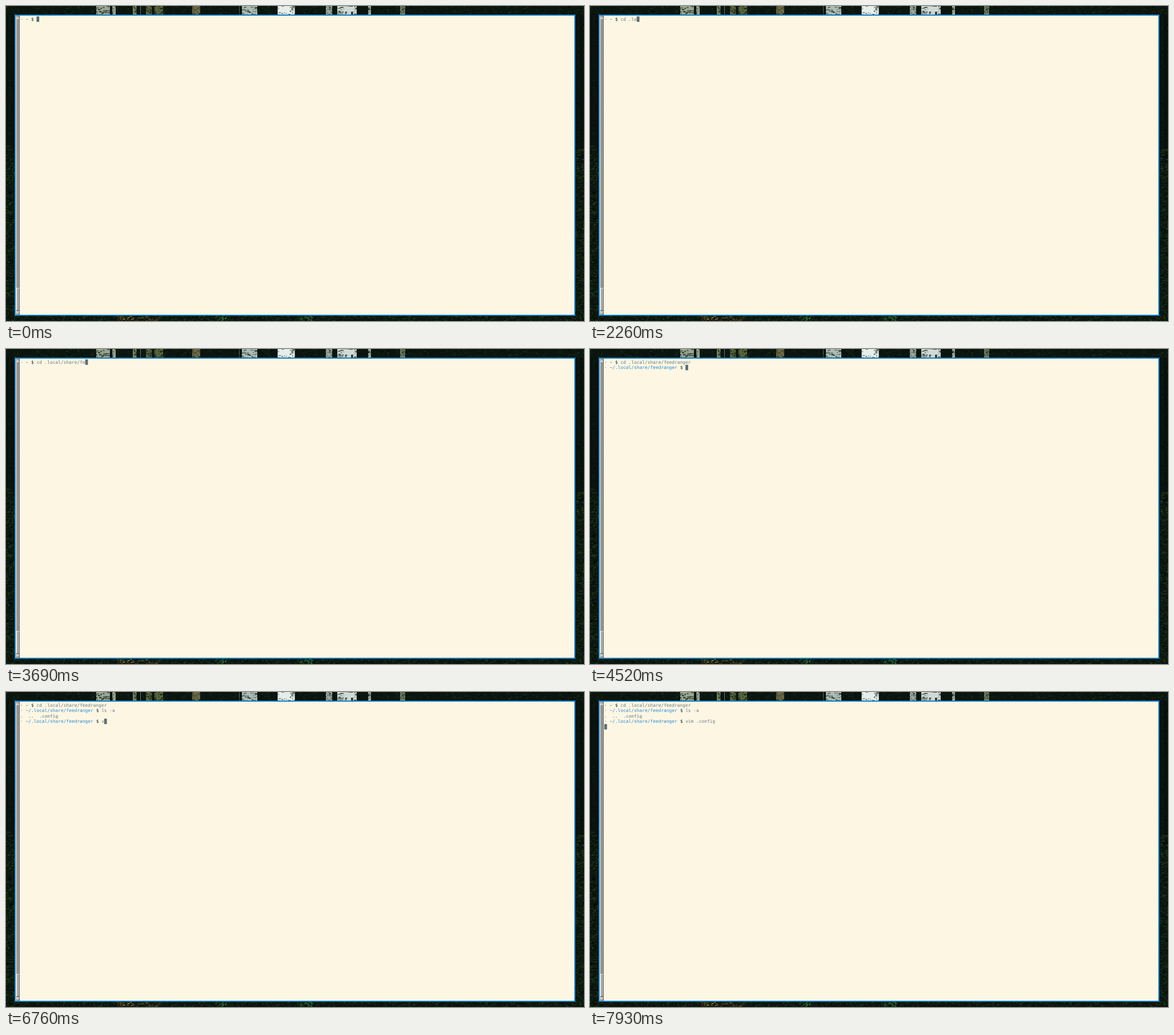
Animation of 1012 by 553 pixels, one loop 8000 ms. Source, as an HTML page with a canvas:

```html
<!DOCTYPE html>
<html lang="en">
<head>
<meta charset="utf-8">
<title>Terminal session</title>
<style>
  html, body { margin: 0; width: 100%; height: 100%; overflow: hidden; background: #0a120d; }
  canvas { display: block; }
</style>
</head>
<body>
<canvas id="stage" width="1012" height="553"></canvas>
<script>
const ctx = document.getElementById('stage').getContext('2d');
const LOOP = 8000, LEFT = 25, TOP = 18, COL = 4.738, ROW = 9.5;
const COLORS = { paper: '#fdf6e3', text: '#657b83', path: '#268bd2', dollar: '#073642', dir: '#93a1a1', cursor: '#586e75' };

// Each entry: start time and the text that has been typed by then.
const cdKeys = [
  [500, 'c'], [720, 'cd'], [840, 'cd '], [1130, 'cd .'], [2090, 'cd .l'], [2260, 'cd .lo'],
  [2360, 'cd .local/'], [2670, 'cd .local/s'], [2810, 'cd .local/sh'], [2890, 'cd .local/sha'],
  [3180, 'cd .local/shar'], [3330, 'cd .local/share/'], [3630, 'cd .local/share/f'],
  [3690, 'cd .local/share/fe'], [3870, 'cd .local/share/fee'], [4040, 'cd .local/share/feedranger']
];
const typed = (text, times) => times.map((t, i) => [t, text.slice(0, i + 1)]);
const commands = [
  { row: 0, at: 0, path: '~', keys: cdKeys, enter: 4210, next: 1 },
  { row: 1, at: 4520, path: '~/.local/share/feedranger', enter: 5770, next: 3,
    keys: typed('ls -a', [5040, 5135, 5230, 5410, 5550]) },
  { row: 3, at: 6110, path: '~/.local/share/feedranger', enter: 7930, next: 4,
    keys: typed('vim .config', [6760, 6840, 6920, 7000, 7160, 7300, 7380, 7460, 7540, 7700, 7740]) }
];

let seed = 11;
function random() {
  seed = (seed * 16807) % 2147483647;
  return seed / 2147483647;
}
const between = (a, b) => a + (b - a) * random();

function rect(color, x, y, w, h) {
  ctx.fillStyle = color;
  ctx.fillRect(x, y, w, h);
}

// Scatter short strokes of foliage over a rectangle.
function foliage(x, y, w, h, count, hue, light) {
  ctx.save();
  ctx.beginPath();
  ctx.rect(x, y, w, h);
  ctx.clip();
  for (let i = 0; i < count; i++) {
    const color = `hsla(${between(hue - 15, hue + 15)}, 38%, ${light * random()}%, .65)`;
    rect(color, between(x - 2, x + w), between(y - 1, y + h), between(1, 4), between(0.7, 2));
  }
  ctx.restore();
}

function drawForest() {
  rect('#0b150f', 0, 0, 1012, 553);
  // Sky gaps between the treetops
  for (const [x, w, color] of [[158, 34, '#9aa794'], [222, 14, '#788465'], [245, 30, '#59633e'],
      [326, 14, '#6d6846'], [408, 32, '#aebbb6'], [470, 38, '#e3ebe8'], [560, 14, '#9ca99f'],
      [580, 34, '#cbd6d3'], [634, 10, '#a3b0a5'], [690, 9, '#6f7d67']])
    rect(color, x, 0, w, 15);
  foliage(0, 0, 1012, 15, 1500, 125, 19);
  for (let x = 5; x < 1012; x += between(15, 45)) rect('#0b1510', x, 0, between(2, 9), 15);
  rect('#e6eeeb', 478, 1, 19, 10);
  rect('#d0dbd7', 592, 1, 17, 9);

  for (const x of [0, 997]) {
    foliage(x, 15, 15, 235, 330, 145, 13);
    for (let i = 0; i < 4; i++) rect('#07100d99', x + between(0, 13), 15, between(1, 3), 260);
    foliage(x, 245, 15, 60, 180, 108, 25);
    foliage(x, 300, 15, 253, 850, 115, 23);
  }
  foliage(10, 281, 5, 19, 45, 100, 40);
  foliage(0, 544, 1012, 9, 1400, 112, 23);
  foliage(192, 544, 78, 9, 140, 42, 52);
  foliage(362, 544, 28, 9, 45, 125, 50);
  foliage(510, 544, 28, 9, 45, 125, 50);
}

function arrow(y, dir) {
  ctx.fillStyle = '#d8d8d8';
  ctx.beginPath();
  ctx.moveTo(20.5, y);
  ctx.lineTo(18, y + 5 * dir);
  ctx.lineTo(23, y + 5 * dir);
  ctx.fill();
}

function drawWindow() {
  rect('#1780ca', 15, 15, 982, 529);
  rect(COLORS.paper, 17, 17, 978, 525);
  rect('#969696', 18, 17, 6, 525);
  rect('#686868', 23, 17, 1, 525);
  arrow(18, 1);
  arrow(541, -1);
  rect('#e0e0e0', 18, 495, 5, 40);
  rect('#aaaaaa', 19, 496, 4, 39);
  rect('#666666', 18, 534, 5, 1);
}

function print(text, col, row, color, weight = 'normal') {
  ctx.font = `${weight} 7.87px "DejaVu Sans Mono", monospace`;
  ctx.fillStyle = color;
  ctx.fillText(text, LEFT + col * COL, TOP + 7.6 + row * ROW);
}

function drawTerminal(t) {
  rect(COLORS.paper, 24, 17, 971, 525);
  let cursor = [0, 0];
  for (const { row, at, path, keys, enter, next } of commands) {
    if (t < at) break;
    const input = keys.filter(([time]) => time <= t).pop()?.[1] ?? '';
    const end = path.length + 5;
    print('·', 0, row, COLORS.text);
    print(path, 2, row, COLORS.path);
    print('$', end - 2, row, COLORS.dollar);
    print(input, end, row, COLORS.text);
    cursor = t < enter ? [end + input.length, row] : [0, next];
  }
  if (t >= 5770) {
    print('.  ..', 0, 2, COLORS.dir, 'bold');
    print('.config', 7, 2, COLORS.dir, 'bold');
  }
  rect(COLORS.cursor, LEFT + cursor[0] * COL, TOP + 0.3 + cursor[1] * ROW, COL, ROW);
}

function frame(now) {
  drawTerminal(now % LOOP);
  requestAnimationFrame(frame);
}

ctx.textRendering = 'geometricPrecision';
drawForest();
drawWindow();
requestAnimationFrame(frame);
</script>
</body>
</html>
```
